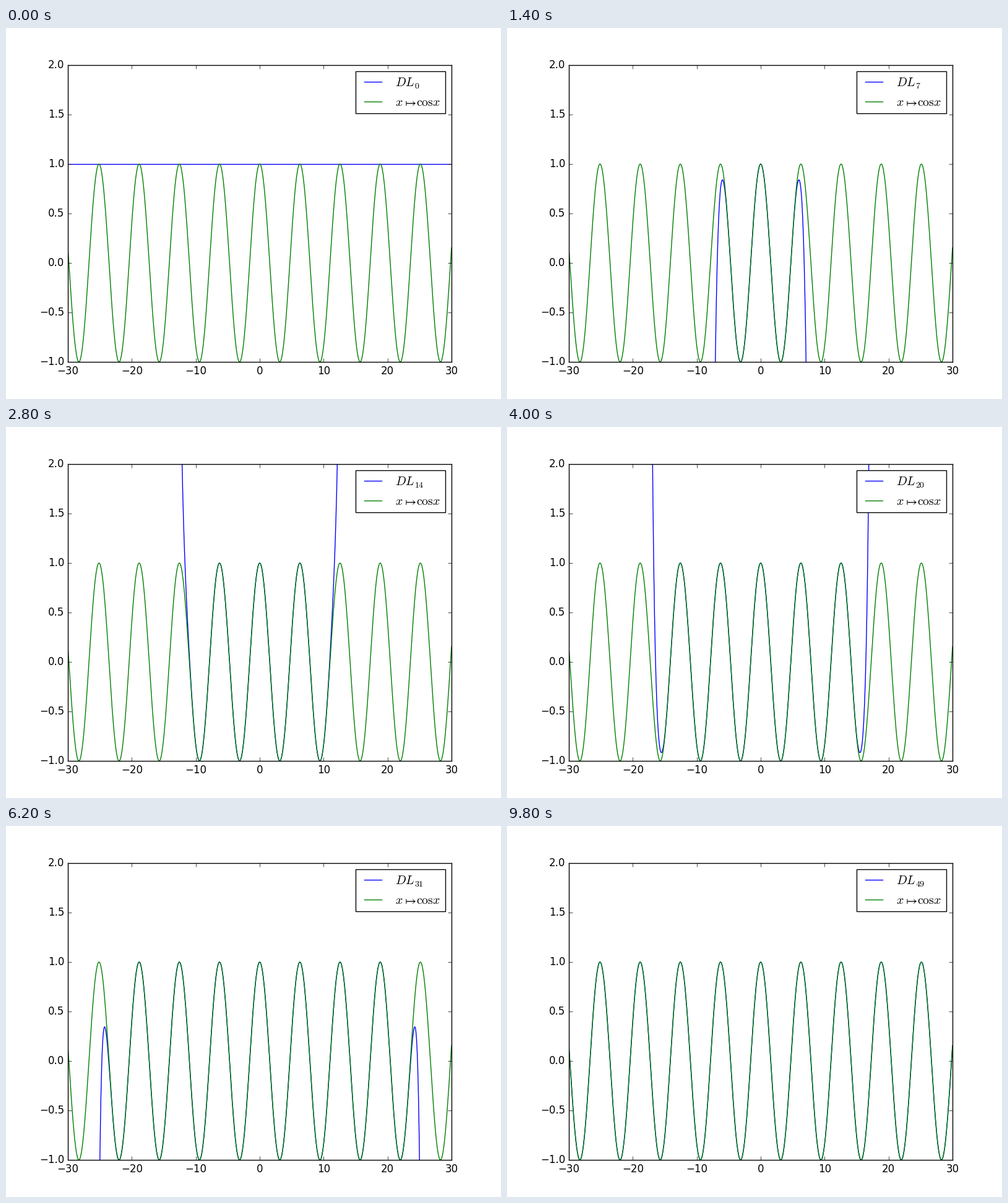
Write a matplotlib script that moves like this. It is 800 by 600 pixels and loops after 10000 ms.

```python
import numpy as np
import matplotlib.pyplot as plt
from matplotlib.animation import FuncAnimation
from matplotlib.lines import Line2D
from matplotlib.patches import Rectangle

W, H, DPI = 800, 600, 100
ORDERS = 50
STEP_MS = 200

plt.style.use("classic")
plt.rcParams["font.family"] = "DejaVu Sans"
plt.rcParams["mathtext.fontset"] = "cm"

fig = plt.figure(figsize=(W / DPI, H / DPI), dpi=DPI, facecolor="white")
ax = fig.add_axes([0.125, 0.1, 0.775, 0.8])
ax.set_xlim(-30, 30)
ax.set_ylim(-1, 2)

x = np.linspace(-30, 30, 1000)


def taylor_sums(x, count):
    """Partial sums of the cosine series, of degree 0, 2, 4, ..."""
    term = np.ones_like(x)
    total = term.copy()
    sums = [total.copy()]
    for k in range(1, count):
        term = -term * x * x / ((2 * k - 1) * (2 * k))
        total = total + term
        sums.append(total)
    return sums


def label(px, py, text, size=14.4, ha="left"):
    return fig.text(px / W, 1 - py / H, text, fontsize=size,
                    ha=ha, va="baseline", zorder=5)


def legend_line(py, color):
    y = 1 - py / H
    fig.add_artist(Line2D([579 / W, 607 / W], [y, y], color=color,
                          lw=1, zorder=4))


sums = taylor_sums(x, ORDERS)
approx, = ax.plot(x, sums[0], color="b", lw=1)
ax.plot(x, np.cos(x), color="g", lw=1)

# Legend, laid out in pixels from the top left
fig.add_artist(Rectangle((565 / W, 1 - 138 / H), 145 / W, 68 / H,
                         fc="white", ec="black", lw=1, zorder=3))
legend_line(87, "b")
legend_line(119, "g")
label(629, 94, r"$DL$")
order = label(660, 98, "$0$", size=14.4 * 0.7)
label(629, 126, r"$x$")
label(652, 126, r"$\mapsto$", ha="center")
label(702, 126, r"$\mathrm{cos}x$", ha="right")


def update(n):
    approx.set_ydata(sums[n])
    order.set_text(f"${n}$")
    return approx, order


anim = FuncAnimation(fig, update, frames=ORDERS, init_func=lambda: update(0),
                     interval=STEP_MS, repeat=True, repeat_delay=0, blit=False)
plt.show()
```
